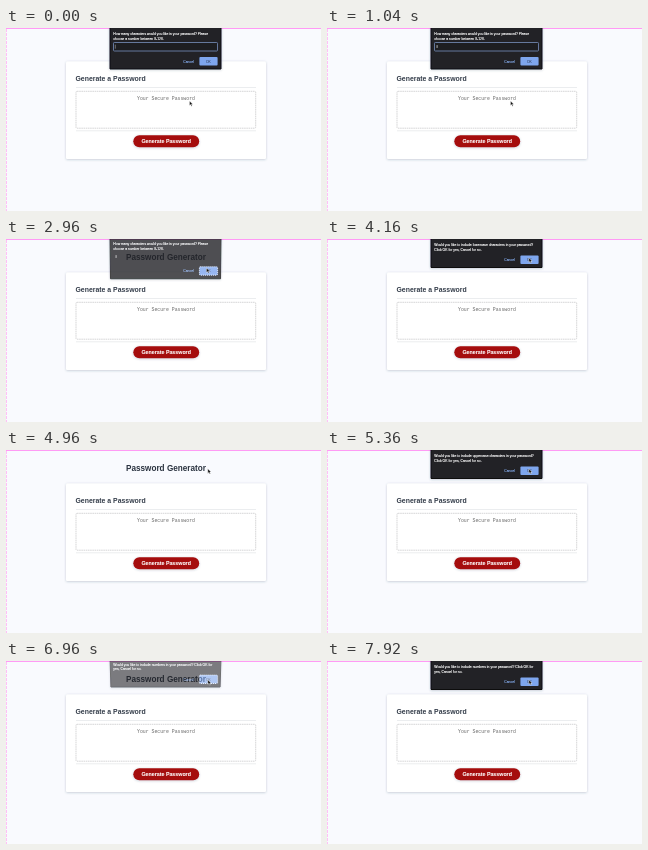
Recreate the animation shown at these times as an HTML page. Size 315x183 px, loop 8000 ms.

```html
<!DOCTYPE html>
<html lang="en">
<head>
<meta charset="utf-8">
<title>Password generator</title>
<style>
  html, body { margin: 0; width: 100%; height: 100%; overflow: hidden; background: #f9fafe; }
  svg { display: block; width: 100vw; height: 100vh; }
  text { font-family: "Liberation Sans", Arial, sans-serif; }
  .bold { font-weight: 700; }
  .mono { font-family: "Liberation Mono", monospace; }
</style>
</head>
<body>
<svg viewBox="0 0 315 183">
  <defs>
    <filter id="shadow" x="-20%" y="-20%" width="140%" height="150%">
      <feDropShadow dx="0" dy=".6" stdDeviation="1" flood-color="#304060" flood-opacity=".28"/>
    </filter>
  </defs>
  <rect width="315" height="183" fill="#f9fafe"/>
  <path d="M0 .5H315" stroke="#ff9af5"/>
  <path d="M.5 1V183" stroke="#ffc0f7" stroke-dasharray="3 1"/>

  <text class="bold" x="120" y="21.2" font-size="8.18" fill="#2b3340">Password Generator</text>

  <rect x="60" y="33.5" width="200" height="97.5" rx="1.5" fill="#fff" filter="url(#shadow)"/>
  <text class="bold" x="69.5" y="52.7" font-size="6.9" fill="#333c49">Generate a Password</text>
  <path d="M70 59.5H250M70 102.8H250" stroke="#e3e5e8" stroke-width=".7"/>
  <rect x="70" y="63.3" width="179.7" height="36.9" rx="1" fill="#fff" stroke="#c4c4c6" stroke-width=".7" stroke-dasharray="1.6 .6"/>
  <text class="mono" x="131" y="71.6" font-size="4.83" fill="#686868">Your Secure Password</text>
  <rect x="127.3" y="107.2" width="65.9" height="12" rx="6" fill="#a50808" filter="url(#shadow)"/>
  <text class="bold" x="160.2" y="115.2" font-size="5.3" fill="#fff" stroke="#fff" stroke-width=".1" text-anchor="middle">Generate Password</text>

  <g id="dialog">
    <path id="panel" fill="#222326" stroke="#0c0c0e" stroke-width="1" filter="url(#shadow)"/>
    <g font-size="3.4" fill="#fff" stroke="#fff" stroke-width=".14">
      <text id="line1" x="107.3" y="7"></text>
      <text id="line2" x="107.3" y="11.8"></text>
    </g>
    <g id="field">
      <rect id="box" x="107.5" y="14.5" width="104" height="8.5" rx=".8" fill="#1d1e21" stroke="#7890bd" stroke-width=".8"/>
      <text id="typed" x="109.3" y="20" font-size="3.4" fill="#eee"></text>
      <path id="caret" d="M109.3 16.7V20.7" stroke="#eee" stroke-width=".4"/>
    </g>
    <g id="actions">
      <text x="182.5" y="22.2" font-size="3.4" fill="#8ab4f8" stroke="#8ab4f8" stroke-width=".1" text-anchor="middle">Cancel</text>
      <rect id="ok" x="193.4" y="16.6" width="18.2" height="8.4" rx="1" fill="#7ea6ee"/>
      <text x="202.4" y="22.2" font-size="3.4" fill="#26344f" text-anchor="middle">OK</text>
    </g>
  </g>
  <path id="cursor" d="M0 0V4.6L1.1 3.6L1.9 5.3L2.7 4.9L1.9 3.3H3.3Z" fill="#111" stroke="#fff" stroke-width=".4"/>
</svg>
<script>
const LOOP = 8000, STEP = 80, FADE = 240;
const $ = id => document.getElementById(id);
const clamp = v => Math.max(0, Math.min(1, v));
const ease = v => v * v * (3 - 2 * v);
const ask = kind => `Would you like to include ${kind} in your password?`;

const dialogs = [
  { from: -FADE, to: 2910, height: 41, lines: ["How many characters would you like in your password? Please", "choose a number between 8-128."] },
  { from: 3160, to: 4720, height: 28.5, lines: [ask("lowercase characters"), "Click OK for yes, Cancel for no."] },
  { from: 5000, to: 6560, height: 28.5, lines: [ask("uppercase characters"), "Click OK for yes, Cancel for no."] },
  { from: 6820, to: 9000, height: 28.5, lines: [ask("numbers") + " Click OK for", "yes, Cancel for no."] }
];
const pointer = [
  [0, 183.5, 73], [1200, 183.5, 73], [1920, 198.5, 37],
  [2640, 200.5, 29], [3120, 200.5, 29], [3680, 201.8, 18.8]
];

function pointerAt(t) {
  const i = pointer.findIndex(p => p[0] > t);
  if (i < 0) return pointer.at(-1).slice(1);
  const [a, b] = [pointer[i - 1], pointer[i]];
  const k = ease((t - a[0]) / (b[0] - a[0]));
  return [1, 2].map(n => a[n] + (b[n] - a[n]) * k);
}

function show(id, visible) {
  $(id).setAttribute("visibility", visible ? "inherit" : "hidden");
}

function drawDialog(t) {
  const d = dialogs.find(d => t >= d.from && t < d.to + FADE);
  show("dialog", d);
  if (!d) return;
  const shown = Math.min(clamp((t - d.from) / FADE), clamp(1 - (t - d.to) / FADE));
  const settled = shown === 1;
  const inset = 2.2 * (1 - shown);
  const prompt = d.height > 30;
  $("dialog").setAttribute("opacity", shown);
  $("dialog").setAttribute("transform", `translate(0 ${-6 * (1 - shown)})`);
  $("panel").setAttribute("d", `M104 -1H215L${215 - inset} ${d.height}H${104 + inset}Z`);
  $("line1").textContent = d.lines[0];
  $("line2").textContent = d.lines[1];
  show("field", prompt);
  show("box", prompt && settled);
  $("actions").setAttribute("transform", `translate(0 ${prompt ? 12.4 : 0})`);
  $("typed").textContent = t >= 960 ? "8" : "";
  show("caret", prompt && t < 960 && t % 1040 < 520);
  $("ok").setAttribute("stroke", settled ? "none" : "#dce8ff");
  $("ok").setAttribute("stroke-dasharray", "1 1");
}

function render(now) {
  const t = Math.floor(now % LOOP / STEP) * STEP;
  drawDialog(t);
  $("cursor").setAttribute("transform", `translate(${pointerAt(t)})`);
}

const start = performance.now();
function tick() {
  render(performance.now() - start);
  requestAnimationFrame(tick);
}
tick();
</script>
</body>
</html>
```
